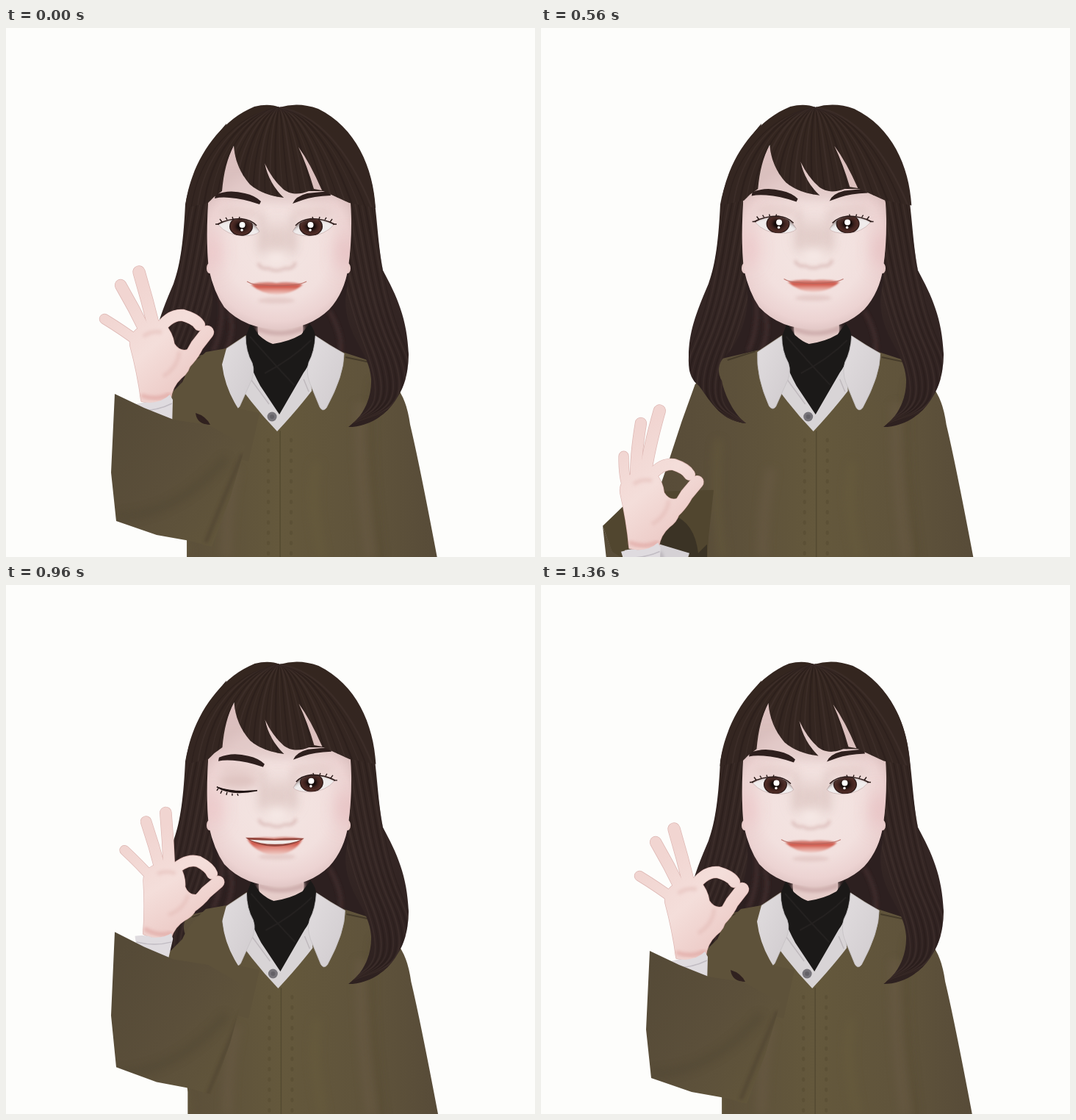
An HTML page for the animation above (1440 ms loop, 720 px wide and 720 px high).

```html
<!DOCTYPE html>
<html lang="en">
<head>
<meta charset="utf-8">
<title>OK wink</title>
<style>
html, body { margin: 0; width: 100%; height: 100%; overflow: hidden; background: #fdfdfb; }
svg { display: block; width: 100vw; height: 100vh; }
</style>
</head>
<body>
<svg viewBox="0 0 720 720">
  <defs>
    <filter id="b1" x="-20%" y="-50%" width="140%" height="200%"><feGaussianBlur stdDeviation=".9"/></filter>
    <filter id="b2" x="-50%" y="-50%" width="200%" height="200%"><feGaussianBlur stdDeviation="2"/></filter>
    <filter id="b6" x="-80%" y="-80%" width="260%" height="260%"><feGaussianBlur stdDeviation="6"/></filter>
    <filter id="b12" x="-80%" y="-80%" width="260%" height="260%"><feGaussianBlur stdDeviation="12"/></filter>
    <radialGradient id="skin" gradientUnits="userSpaceOnUse" cx="370" cy="300" r="118">
      <stop offset="0" stop-color="#f4e6e3"/><stop offset=".6" stop-color="#f2e0de"/>
      <stop offset=".84" stop-color="#ecd3d2"/><stop offset="1" stop-color="#dcc0bf"/>
    </radialGradient>
    <linearGradient id="hand" gradientUnits="userSpaceOnUse" x1="150" y1="380" x2="245" y2="490">
      <stop offset="0" stop-color="#f1d5d1"/><stop offset=".5" stop-color="#f4deda"/><stop offset="1" stop-color="#eccac6"/>
    </linearGradient>
    <linearGradient id="coat" gradientUnits="userSpaceOnUse" x1="140" y1="0" x2="590" y2="0">
      <stop offset="0" stop-color="#574b38"/><stop offset=".25" stop-color="#5c503a"/>
      <stop offset=".52" stop-color="#64583c"/><stop offset=".8" stop-color="#5f533b"/><stop offset="1" stop-color="#574b38"/>
    </linearGradient>
    <linearGradient id="sleeve" gradientUnits="userSpaceOnUse" x1="140" y1="520" x2="320" y2="640">
      <stop offset="0" stop-color="#554a37"/><stop offset=".55" stop-color="#5b4f3a"/><stop offset="1" stop-color="#61553b"/>
    </linearGradient>
    <linearGradient id="hair" gradientUnits="userSpaceOnUse" x1="0" y1="105" x2="0" y2="540">
      <stop offset="0" stop-color="#34261f"/><stop offset=".6" stop-color="#342624"/><stop offset="1" stop-color="#2e2120"/>
    </linearGradient>
    <linearGradient id="collar" x1="0" y1="0" x2="1" y2="1">
      <stop offset="0" stop-color="#e1dddf"/><stop offset="1" stop-color="#d0cbce"/>
    </linearGradient>
    <linearGradient id="lip" x1="0" y1="0" x2="0" y2="1">
      <stop offset="0" stop-color="#d89a92"/><stop offset=".35" stop-color="#cf5548"/>
      <stop offset=".6" stop-color="#e08d82"/><stop offset="1" stop-color="#f0d3ce"/>
    </linearGradient>
    <radialGradient id="iris">
      <stop offset=".3" stop-color="#150c0b"/><stop offset=".55" stop-color="#3d211d"/>
      <stop offset=".85" stop-color="#512d27"/><stop offset="1" stop-color="#201211"/>
    </radialGradient>
    <clipPath id="eyeClip"><path id="eyeShape" d="M289 268Q302 260 320 260Q338 263 345 277Q340 283 322 283Q301 282 289 268Z"/></clipPath>
    <clipPath id="faceClip"><path id="faceShape" d="M276 190L275 240Q272 290 276 328Q283 360 297 380Q325 410 372 410Q413 409 440 383Q461 360 466 325Q472 280 469 238L455 180Q370 130 290 170Z"/></clipPath>
    <clipPath id="capClip"><path id="capShape" d="M244 245C248 195 282 130 338 107Q358 102 372 108Q398 100 425 110C476 135 500 190 503 245L467 238L432 222L412 222Q392 230 378 220Q362 206 352 184Q358 212 378 231Q350 228 332 213Q312 190 310 160Q297 185 294 222L283 230L275 238Z"/></clipPath>
    <clipPath id="lockClip"><path id="leftLock" d="M300 130C270 165 250 205 244 240C241 300 236 325 228 348C210 390 201 415 201 448C200 470 206 480 215 487C232 510 245 535 279 538C262 525 250 500 246 480C238 466 243 452 252 446C275 420 285 380 280 350C276 330 274 280 276 230Z"/><path id="rightLock"/></clipPath>
    <clipPath id="coatClip"><path id="coatShape"/></clipPath>
    <clipPath id="sleeveClip"><path id="front"/></clipPath>
    <g id="eye">
      <use href="#eyeShape" fill="#f0ecec" stroke="#cbb2b0" stroke-width=".8"/>
      <g clip-path="url(#eyeClip)">
        <ellipse cx="320" cy="270" rx="16" ry="13" fill="url(#iris)"/>
        <path d="M286 266Q318 252 348 277L346 266Q318 252 286 262Z" fill="#4b3a39" opacity=".6" filter="url(#b2)"/>
      </g>
      <path d="M288 267Q302 259.5 320 259.5Q334 261 341 269" fill="none" stroke="#2a1a18" stroke-width="1.6"/>
      <path d="M290 267l-5 0M294 264l-3 -4M301 261l-2 -3M309 260l-1 -3M317 260l1 -3" stroke="#2a1a18" stroke-width="1.4"/>
    </g>
    <g id="glintShape" fill="#fff"><circle cx="321.5" cy="268" r="4"/><circle cx="321" cy="275" r="1.8"/></g>
  </defs>

  <path d="M275 200L465 200L500 380L500 470L235 470L250 380Z" fill="#2d2020"/>
  <path d="M290 350Q300 400 282 440M304 386Q312 410 300 440M440 385Q460 420 455 445" stroke="#3d2c2b" stroke-width="6" fill="none" filter="url(#b2)"/>

  <g id="torso">
    <use href="#coatShape" fill="url(#coat)"/>
    <g clip-path="url(#coatClip)" fill="none">
      <path d="M500 480Q488 560 512 730" stroke="#51462f" stroke-width="5" opacity=".55" filter="url(#b6)"/>
      <path d="M482 510Q480 600 496 720M312 600Q300 650 300 720" stroke="#6d5d4a" stroke-width="14" opacity=".45" filter="url(#b6)"/>
      <path d="M423 590Q412 640 430 720M240 560Q232 640 246 720" stroke="#6b5f3e" stroke-width="12" opacity=".4" filter="url(#b6)"/>
      <path d="M373 548V720" stroke="#544a31" stroke-width="1.5"/>
      <path d="M357 560V720M388 560V720" stroke="#50462f" stroke-width="4" stroke-linecap="round" stroke-dasharray="2 12" opacity=".4"/>
      <path d="M462 448L495 455M252 452L290 440" stroke="#453b2a" stroke-width="2"/>
    </g>
    <path d="M328 440L325 497Q345 524 369 549Q396 520 416 494L412 440Z" fill="#d8d4d6"/>
    <path d="M333 478L358 512M405 478L412 495" stroke="#bfb9bd" stroke-width="1.5"/>
    <path d="M342 385H404V425L365 440L343 422Z" fill="#e6cdca"/>
    <path d="M342 405Q372 420 405 404V413Q372 424 342 413Z" fill="#cfafae" filter="url(#b2)"/>
    <path d="M333 402L344 418Q354 427 363 430Q385 427 402 417L413 402Q422 413 421 425Q416 455 405 469L372 526L346 487Q326 450 324 426Z" fill="#1b1918"/>
    <path d="M332 420Q360 452 392 486M415 425Q390 450 352 470" stroke="#242120" stroke-width="2" fill="none"/>
    <path d="M326 419L293 441Q291 475 309 515Q314 521 318 515L331 486Q340 470 335 456Q326 440 326 419Z" fill="url(#collar)" stroke="#c5c0c3" stroke-width=".8"/>
    <path d="M421 419Q440 432 460 443Q460 473 436 517Q431 523 427 516L413 482Q408 468 412 455Q420 440 421 419Z" fill="url(#collar)" stroke="#c5c0c3" stroke-width=".8"/>
    <circle cx="362" cy="529" r="6.5" fill="#77747a"/><circle cx="362" cy="529" r="3" fill="#646167"/>
  </g>

  <g fill="url(#hair)"><use href="#leftLock"/><use href="#rightLock"/></g>
  <g clip-path="url(#lockClip)" fill="none">
    <g id="lockStrands"></g>
    <use href="#lockStrands" transform="translate(748 0) scale(-1 1)"/>
  </g>

  <ellipse cx="277" cy="327" rx="4" ry="7" fill="#e8cac8"/><ellipse cx="465" cy="327" rx="4" ry="7" fill="#e8cac8"/>
  <use href="#faceShape" fill="url(#skin)"/>
  <g clip-path="url(#faceClip)"><g id="face">
    <path d="M265 225Q372 250 475 228V185H265Z" fill="#d9bfbd" opacity=".55" filter="url(#b6)"/>
    <ellipse cx="282" cy="305" rx="13" ry="26" fill="#eab9bd" opacity=".55" filter="url(#b12)"/>
    <ellipse cx="460" cy="305" rx="13" ry="26" fill="#e3b2b6" opacity=".6" filter="url(#b12)"/>
    <ellipse cx="369" cy="288" rx="20" ry="20" fill="#cdb0ab" opacity=".55" filter="url(#b12)"/>
    <path d="M346 252Q352 275 348 305M394 252Q386 275 391 305" stroke="#cfb2ae" stroke-width="8" fill="none" opacity=".45" filter="url(#b6)"/>
    <ellipse cx="318" cy="252" rx="27" ry="8" fill="#dcbfbc" opacity=".5" filter="url(#b6)"/>
    <ellipse cx="418" cy="252" rx="27" ry="8" fill="#dcbfbc" opacity=".5" filter="url(#b6)"/>
    <path d="M343 320Q347 329 357 327Q368 333 379 327Q391 329 394 319" stroke="#c99f9b" stroke-width="4" fill="none" opacity=".5" filter="url(#b2)"/>
    <ellipse cx="368" cy="314" rx="14" ry="8" fill="#f6e9e6" filter="url(#b6)"/>
    <ellipse cx="368" cy="371" rx="25" ry="4" fill="#d9b7b4" opacity=".5" filter="url(#b2)"/>
    <path id="brow" d="M284 232L285 227Q303 219 325 225Q339 228 347 236L345 240Q322 232 304 231Q292 230 284 232Z" fill="#2e1f1d"/>
    <path d="M390 239Q394 229 410 225L440 222L442 228Q418 229 404 234Z" fill="#2e1f1d"/>
    <g id="leftEye"><use href="#eye"/><use href="#glintShape"/></g>
    <use href="#eye" transform="translate(735 0) scale(-1 1)"/>
    <use href="#glintShape" x="93"/>
    <g id="closed">
      <ellipse cx="315" cy="268" rx="27" ry="11" fill="#dfc4c1" filter="url(#b6)"/>
      <path d="M286 276Q305 288 341 281Q306 284 286 276Z" fill="#201312" stroke="#201312" stroke-width="1.5"/>
      <path d="M288 278l-2 3M293 281l-2 4M300 283l-1 4M307 285l0 3M314 285l1 3" stroke="#201312" stroke-width="1.4"/>
    </g>
    <g id="mouthShut">
      <path d="M333 349Q352 344 368 347Q386 344 404 349Q390 362 368 363Q348 362 333 349Z" fill="url(#lip)" filter="url(#b1)"/>
      <path d="M328 345Q336 350 350 350Q368 352 388 350Q402 349 409 345" fill="none" stroke="#b5665d" stroke-width="1.3" opacity=".8"/>
    </g>
    <g id="mouthOpen">
      <path d="M327 347Q345 343 364 345Q385 342 403 347Q392 367 365 369Q340 367 327 347Z" fill="url(#lip)" filter="url(#b1)"/>
      <path d="M325 345Q345 345 364 347Q385 345 405 346Q390 357 365 357Q341 357 325 345Z" fill="#94483f"/>
      <path d="M331 348Q365 350 400 348Q388 354 365 354Q344 354 331 348Z" fill="#f1ecea"/>
    </g>
  </g></g>

  <g id="cap">
    <use href="#capShape" fill="url(#hair)"/>
    <g id="capStrands" fill="none" clip-path="url(#capClip)"></g>
    <path d="M398 162Q414 184 430 221L419 219Q410 188 398 162Z" fill="#dcc0be"/>
  </g>

  <g id="arm">
    <g id="shoulder">
      <path d="M300 436L272 441Q248 462 240 482L222 500L220 560L330 590L345 524L316 518Q298 490 294 458Z" fill="#5e523a"/>
      <path id="lockTip" d="M258 524Q272 528 278 540Q260 540 258 524Z" fill="#30211f"/>
    </g>
    <g id="inside">
      <path d="M120 575L150 546L200 528L271 526L264 590L262 625L243 656L230 670L180 645L133 612Z" fill="#51462f"/>
      <path d="M215 560Q245 570 250 612L262 600L262 625L243 654L236 640L238 612L190 615Z" fill="#3b3325"/>
      <path d="M150 608L198 600L238 612L222 660L150 628Z" fill="#d5d1d5"/>
      <path d="M198 610L212 650" stroke="#b3adb4" stroke-width="4" filter="url(#b2)"/>
    </g>
    <g id="handGroup">
      <g id="edges" fill="none" stroke="#dcb5b1" stroke-linecap="round" stroke-linejoin="round"></g>
      <g id="flesh" fill="none" stroke="url(#hand)" stroke-linecap="round" stroke-linejoin="round"></g>
      <path d="M236 440Q234 462 214 474M187 420Q196 412 212 414" stroke="#dfb3ae" stroke-width="5" fill="none" opacity=".45" filter="url(#b2)"/>
      <path d="M184 500Q204 508 224 498" stroke="#dc9a95" stroke-width="5" fill="none" opacity=".6" filter="url(#b2)"/>
      <path d="M173 513Q188 508 196 510Q213 509 223 499L227 506L226 545L186 550Z" fill="#dfdbdf"/>
      <path d="M177 521Q204 522 226 511" stroke="#c1bcc3" stroke-width="1.5" fill="none"/>
    </g>
    <use href="#front" fill="url(#sleeve)"/>
    <g clip-path="url(#sleeveClip)" fill="none">
      <path d="M322 580Q300 630 272 700" stroke="#483e2d" stroke-width="5" opacity=".5" filter="url(#b2)"/>
      <path d="M150 665Q230 665 300 585" stroke="#4e4431" stroke-width="10" opacity=".45" filter="url(#b6)"/>
    </g>
  </g>
</svg>
<script>
const $ = id => document.getElementById(id);
const NS = 'http://www.w3.org/2000/svg';
const STEP = 80, COUNT = 18;

function add(parent, attrs) {
  const p = document.createElementNS(NS, 'path');
  for (const k in attrs) p.setAttribute(k, attrs[k]);
  $(parent).appendChild(p);
  return p;
}
const clamp = v => Math.max(0, Math.min(1, v));
const mix = (a, b, u) => a + (b - a) * u;
const mixAll = (a, b, u) => a.map((v, i) => mix(v, b[i], u));
const ramp = (f, a, b) => { const u = clamp((f - a) / (b - a)); return u * u * (3 - 2 * u); };
const bump = (f, mid, width) => Math.exp(-(((f - mid) / width) ** 2));
const show = (id, on) => $(id).style.display = on ? '' : 'none';
const move = (id, t) => $(id).setAttribute('transform', t);

// Hair: locks flow down from the parting, the cap fans out from the crown.
function strand(parent, i, d) {
  add(parent, { d, stroke: i % 2 ? '#443430' : '#271b19', 'stroke-width': 1.2 + i % 3 * .6, opacity: .5 });
}
for (let i = 0; i < 14; i++) {
  const o = i * 6;
  strand('lockStrands', i, `M${300 + o * .4} 120C${234 + o} 200 ${252 + o * .6} 330 ${206 + o * .7} 430S${235 + o * .4} 520 280 540`);
}
for (let i = 0; i < 30; i++) {
  const u = i / 29, x = mix(252, 498, u);
  strand('capStrands', i, `M372 108C${mix(310, 430, u)} 118 ${mix(262, 470, u)} 175 ${x} 245`);
}

// Hand: palm, pinky, ring, middle, index, thumb.
const PALM = 'M184 508Q179 470 169 433Q166 417 183 406Q203 392 216 403Q227 415 229 430Q236 441 247 438Q258 462 238 477Q226 488 224 506Q205 514 184 508Z';
const widths = [0, 13, 15, 16, 15, 17];
const edges = widths.map(w => add('edges', { 'stroke-width': w + 1.4 }));
const flesh = widths.map(w => add('flesh', { 'stroke-width': w }));
flesh[0].setAttribute('fill', 'url(#hand)');

function drawHand(close) {
  const x = 38 * close, y = -14 * close;
  const finger = (bx, by, tx, ty) =>
    `M${bx} ${by}Q${mix(bx, tx, .45) + x * .35} ${mix(by, ty, .5)} ${tx + x} ${ty + y}`;
  const paths = [PALM,
    finger(180, 427, 134, 396), finger(190, 414, 156, 350), finger(202, 410, 181, 332),
    'M206 414Q222 389 241 391Q258 396 263 404',
    'M228 468Q250 453 260 432L274 414'];
  paths.forEach((d, i) => { edges[i].setAttribute('d', d); flesh[i].setAttribute('d', d); });
}

// Sleeve outline with the arm raised, and half lifted.
const RAISED = [148,498, 188,517, 228,533, 275,540, 326,568, 305,640, 280,706, 250,698, 205,690, 150,671, 143,605];
const LIFTED = [120,575, 133,610, 180,640, 230,663, 306,684, 295,720, 280,740, 230,740, 180,718, 148,690, 125,620];
const coatUp = [245,450, 208,485, 215,545, 238,620, 246,690, 246,722];
const coatDown = [245,450, 208,485, 190,535, 168,602, 145,668, 126,722];

function drawArm(f) {
  const raise = 1 - ramp(f, 0, 4) + ramp(f, 6, 10);
  const drop = 3 * (1 - raise) ** 1.6;
  const high = ramp(f, 8, 10.5) * (1 - ramp(f, 11.5, 15.5));
  const near = Math.min(1, drop), far = Math.max(0, drop - 1);

  const side = mixAll(coatUp, coatDown, clamp(far));
  $('coatShape').setAttribute('d', `M296 438L${side}L587 722Q562 590 550 540Q546 512 537 497Q520 465 495 453L455 440L420 418H326Z`);

  const sleeve = mixAll(RAISED, LIFTED, near).map((v, i) =>
    i % 2 ? v + 80 * far - 27 * high * (1 - (v - 498) / 400) : v - 28 * far);
  $('front').setAttribute('d', `M${sleeve}Z`);
  show('arm', raise > 0);
  show('shoulder', drop < .5);
  show('lockTip', high < .93);
  move('lockTip', `translate(0 ${-9 * high})`);
  show('inside', drop >= .5);
  move('inside', `translate(${sleeve[0] - 120} ${sleeve[1] - 575})`);

  const x = 205 - 28 * drop + 2 * high;
  const y = 505 + 75 * drop + 10 * drop * far - 30 * high;
  const turn = 12 * high + 2 * near;
  move('handGroup', `translate(${x} ${y}) rotate(${turn}) scale(${1 - .004 * turn}) translate(-205 -505)`);
  drawHand(near);
}

function drawHead(f) {
  const rise = bump(f, 8.5, 4), dip = bump(f, 15, 2.5);
  const fx = 3 * rise - 2 * dip, fy = 3 * dip - 4 * rise;
  const tip = 12 * bump(f, 15, 1);
  const wink = ramp(f, 10, 12) - ramp(f, 13, 15);

  move('torso', `translate(${2 * bump(f, 9, 5)} 0)`);
  // The crown stays put while the fringe follows the face.
  move('cap', `translate(${fx * .5} ${-fy * .8}) scale(1 ${1 + fy / 135})`);
  $('rightLock').setAttribute('d', `M440 120C480 150 496 190 501 230C506 270 507 300 513 330C532 365 546 395 548 445C547 480 538 495 530 507C515 530 490 543 ${466 + tip} 543C${485 + tip * .6} 530 498 505 497 478C495 440 462 420 462 370L467 330V230Z`);

  move('face', `translate(${fx} ${fy})`);
  const shut = wink > .8, open = wink > .3;
  show('leftEye', !shut);
  show('closed', shut);
  move('leftEye', `translate(0 ${276 * wink}) scale(1 ${1 - wink})`);
  move('brow', `translate(${4 * wink} ${9 * wink})`);
  show('mouthShut', !open);
  show('mouthOpen', open);
  const gape = mix(.7, 1, wink);
  move('mouthOpen', `translate(0 ${346 * (1 - gape)}) scale(1 ${gape})`);
}

function draw(ms) {
  const f = Math.floor(ms / STEP) % COUNT;
  drawArm(f);
  drawHead(f);
}

const start = performance.now();
function tick() {
  draw(performance.now() - start);
  requestAnimationFrame(tick);
}
tick();
</script>
</body>
</html>
```
